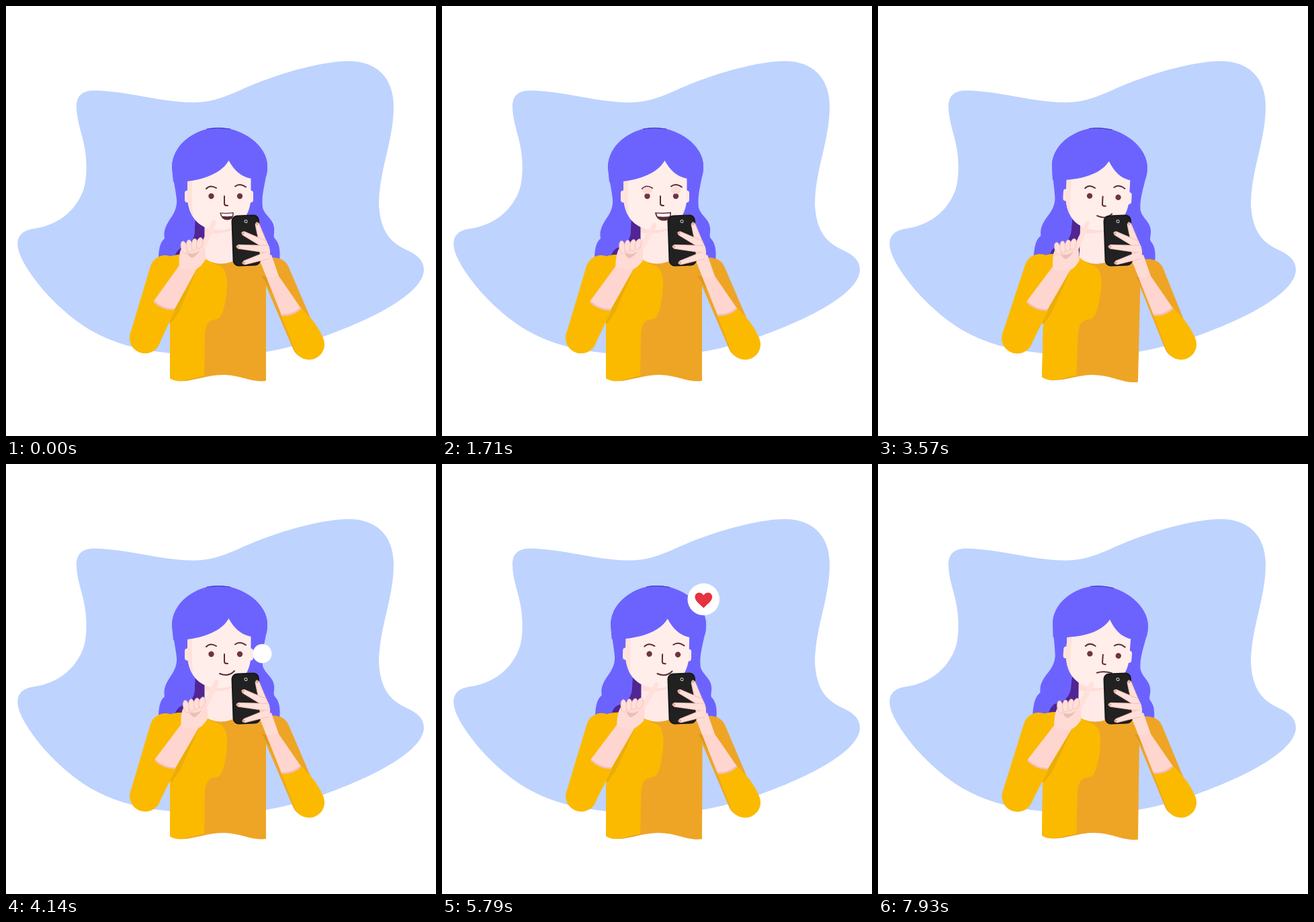
These frames come from a looping animation (640x640 px, 8000 ms). An HTML page:

```html
<!DOCTYPE html>
<html lang="en">
<head>
<meta charset="utf-8">
<title>Woman with phone</title>
<style>
  html, body { margin: 0; width: 100%; height: 100%; overflow: hidden; background: #fff; }
  svg { display: block; width: 100vw; height: 100vh; }
  .line { fill: none; stroke: #5f2a38; stroke-width: 2; stroke-linecap: round; stroke-linejoin: round; }
  .skin { fill: #ffd5cf; }
  .cuff { fill: none; stroke: #f3bdbb; stroke-width: 2.5; }
  .finger { fill: #ffdfd9; stroke: #f0b8b0; stroke-width: .7; }
  .sleeve { stroke-linecap: round; }
</style>
</head>
<body>
<svg viewBox="0 0 640 640">
  <path fill="#bed3fe" d="M105 152C104 130 117 124 140 126C190 129 235 144 282 143.500C325 142 345 123 400 105C435 93 480 82 510 82C550 82 577 105 577 150C577 200 555 245 555 295C557 335 572 352 596 363C613 371 622 379 622 393C620 430 540 468 470 493C400 517 340 526 260 518C200 514 160 502 125 482C80 455 38 408 22 373C12 350 18 336 38 332C62 329 85 319 101 299C117 279 120 262 119.500 235C119 200 106 180 105 152Z"/>

  <g class="head">
    <path fill="#6c63ff" d="M247 240C247 205 285 181 316 181C352 181 389 208 389 238C389 243 389 249 387 254C384 270 380 285 382 300C385 312 398 317 399 330C400 338 397 342 400 346C406 352 409 362 407 380H227C227 362 229 352 236 346C234 335 238 327 243 319C250 309 255 300 254 288C252 270 248 255 247 240Z"/>
    <path fill="#512593" d="M282 315L305 325V378H250C252 366 257 361 264 359C276 355 282 345 281 330Z"/>
  </g>

  <line id="armL" class="sleeve" stroke="#fbba00" stroke-width="46"/>
  <line id="armR" class="sleeve" stroke="#eea526" stroke-width="42"/>

  <g id="body">
    <path fill="#eea526" d="M244 554V420L225 385Q240 370 262 370L296 374Q320 392 345 375L402 374.500L387 410V558C365 561 350 549 322 549C292 549 265 566 244 554Z"/>
    <path fill="#fbba00" d="M244 554V420L225 385Q240 370 262 370L296 374Q305 383 316 386C326 390 329 400 329 413C328 440 323 464 314 466C300 467 297 475 296 490L295 550.500C275 553 258 564 244 554Z"/>
    <path fill="#ffeae7" d="M295.500 322H340L347 375Q334 383.500 320 383.500Q305 383.500 295.500 375Z"/>
    <path fill="#ffdcd8" d="M296 328H338V333Q318 341 296 337Z"/>
    <path fill="#d99a1c" d="M380 401L387 403L394 424L387 412Z"/>
  </g>

  <g class="head">
    <rect x="266" y="274.500" width="10" height="18" rx="4" fill="#ffe6e0"/>
    <rect x="358" y="274.500" width="10" height="18" rx="4" fill="#ffe9e4"/>
    <path fill="#ffeeea" d="M270 250V285C271 316 290 334 319 333.500C346 333 362 315 364.500 288V240L331 225Z"/>
    <path fill="#ffe2da" d="M270 255H277V292Q277 304 279 313Q270 300 270 284Z"/>
    <path fill="#6c63ff" d="M249 262Q260 262 270 261C300 257 322 247 331.500 230C341 247 352 255 366 257L387 253C389 246 389 242 389 238C389 208 352 181 316 181C285 181 247 205 247 240Z"/>
    <path d="M299 183Q316 180 334 183" fill="none" stroke="#3f3ab8"/>
    <path class="line" d="M298 272Q304 265.500 313 271M341 268.500Q348 263 357 269.500"/>
    <g id="eyes"></g>
    <path class="line" d="M325 283V294.500Q325.500 297.500 330 297"/>
    <path id="lips" class="line"/>
    <g id="open">
      <path fill="#5b2936" d="M-11 -5Q0 -4 11 -5.500Q11.500 6 1 6Q-9 6 -11 -5Z"/>
      <path fill="#fff" d="M-9 -3.700Q0 -2.800 9.500 -4Q9.500 -.5 8.500 .3Q0 1 -7.500 .3Z"/>
    </g>
  </g>

  <g id="bubble">
    <circle r="20.500" fill="#fff"/>
    <path id="heart" fill="#e5323e" d="M0 11C-5 6 -11 2 -11 -3C-11 -9.500 -3 -10.500 0 -5C3 -10.500 11 -9.500 11 -3C11 2 5 6 0 11Z"/>
    <path id="rays" fill="none" stroke="#e5323e" stroke-width="2" stroke-linecap="round"/>
  </g>

  <g id="foreL">
    <path fill="#ebad06" d="M270 400L285 389Q276 413 257 456L246 472L239 470Z"/>
    <path fill="#fbba00" d="M187 483L220 438L252 452L227 505Z"/>
    <path class="skin" d="M220 439L258 386L297 374Q294 386 284 391L251 451Q234 453 220 439Z"/>
    <path class="cuff" d="M220.500 440.500Q234 452 250.500 451.500"/>
    <g id="handL">
      <path fill="#ffe0da" d="M286 364L308 321Q311 317.500 314 321Q315 324 297 360L292 372Z"/>
      <path fill="#ffdbd5" d="M258 390Q256 368 263 358L294 354Q299 366 297 378Q290 388 280 393Z"/>
      <g id="knuckles"></g>
      <path fill="#e9bfb6" d="M270 367Q279 371 289 364Q283 373 277 375Q271 372 270 367Z"/>
    </g>
  </g>
  <circle id="elbowL" r="23" fill="#fbba00"/>

  <path fill="#fbba00" d="M410 461L430 513A23 23 0 1 0 472 494Q464 476 453 464L439 449Z"/>
  <path class="skin" d="M382 378L387 402L410 460Q426 462 439 450L406 402L395 370Z"/>
  <path class="cuff" d="M410 460Q427 461 438.500 450"/>

  <g transform="rotate(-2 357 349)">
    <rect x="336.500" y="311" width="41.500" height="76" rx="8.500" fill="#212121"/>
    <rect x="338" y="312.500" width="38.500" height="73" rx="7" fill="none" stroke="#151515"/>
    <circle cx="358" cy="320.500" r="2" fill="#111" stroke="#ddd"/>
  </g>
  <path fill="#ffdbd5" d="M380 346L386 348Q394 358 393 370L405 401Q396 406 387 402L379 382L377 362Z"/>
  <g id="grip"></g>
</svg>

<script>
  const LOOP = 8000, TAU = Math.PI * 2;
  const $ = id => document.getElementById(id);
  const heads = document.querySelectorAll('.head');

  const clamp = v => Math.max(0, Math.min(1, v));
  const mix = (a, b, u) => a + (b - a) * u;
  const ramp = (t, a, b) => { const u = clamp((t - a) / (b - a)); return u * u * (3 - 2 * u); };
  const pulse = (t, a, b, c, d) => ramp(t, a, b) - ramp(t, c, d);

  function set(el, attrs) {
    for (const k in attrs) el.setAttribute(k, attrs[k]);
    return el;
  }
  function add(parent, tag, attrs) {
    return parent.appendChild(set(document.createElementNS('http://www.w3.org/2000/svg', tag), attrs));
  }
  function show(el, on) { el.style.display = on ? '' : 'none'; }
  function turn(x, y, deg, cx, cy) {
    const a = deg * Math.PI / 180, dx = x - cx, dy = y - cy;
    return [cx + dx * Math.cos(a) - dy * Math.sin(a), cy + dx * Math.sin(a) + dy * Math.cos(a)];
  }
  function limb(el, [x1, y1], [x2, y2]) { set(el, { x1, y1, x2, y2 }); }

  // Tapered finger with a nail, from its base to its tip
  function finger(x, y, tipX, tipY) {
    const len = Math.hypot(tipX - x, tipY - y), angle = Math.atan2(tipY - y, tipX - x) * 360 / TAU;
    const g = add($('grip'), 'g', { transform: `translate(${x} ${y}) rotate(${angle})` });
    add(g, 'path', { class: 'finger', d: `M0 -5.500L${len - 3} -3Q${len + 3} 0 ${len - 3} 3L0 5.500` });
    add(g, 'ellipse', { cx: len - 2, rx: 2.500, ry: 1.600, fill: '#e5a994' });
  }
  finger(382, 351, 373, 322);
  finger(386, 355, 351, 337);
  finger(389, 362, 343, 358);
  finger(389, 371, 352, 383);

  for (let i = 0; i < 4; i++) {
    add($('knuckles'), 'ellipse', {
      class: 'finger', rx: 4.500, ry: 9.500 - i * .4,
      transform: `translate(${265.500 + i * 7.800} ${359 - i * 2}) rotate(${i * 9 - 12})`,
    });
  }
  const lids = [305.500, 348].map(cx => {
    add($('eyes'), 'circle', { cx, cy: 283, r: 4.200, fill: '#6f3441' });
    return add($('eyes'), 'ellipse', { cx, rx: 7.500, fill: '#fbdcd7' });
  });

  function drawFace(t) {
    const blink = Math.max(...[1810, 5110].map(c => clamp(1 - Math.abs(t - c) / 130)));
    const ry = 4 + 5.500 * blink;
    for (const lid of lids) set(lid, { cy: 269 + ry, ry, opacity: clamp(blink * 5) });

    const shut = ramp(t, 3350, 3560), grin = Math.sin(Math.PI * t / 1140) ** 2;
    const x = 328.500 + grin * .5, y = 312.500 + grin * .4;
    set($('open'), { transform: `translate(${x} ${y}) scale(${.93 + .16 * grin} ${(1 + .12 * grin) * (1 - .8 * shut)})` });
    show($('open'), shut < 1);

    const sad = ramp(t, 6950, 7250);
    set($('lips'), { d: `M318 ${mix(312, 310.500, sad)}Q${mix(331, 328, sad)} ${mix(317.500, 306.500, sad)} 340 ${mix(308, 309.500, sad)}` });
    show($('lips'), shut === 1);
  }

  function drawBubble(t) {
    const u = clamp((t - 3700) / 2730);
    const x = 373 + 15 * u + 6 * Math.sin(3 * Math.PI * u);
    const y = 191 + 123 * (1 - u) ** 1.7;
    const size = 1.270 * Math.cbrt(u);
    set($('bubble'), {
      transform: `translate(${x} ${y}) scale(${size})`,
      opacity: 1 - .64 * ramp(t, 6050, 6430) - .36 * ramp(t, 6430, 6700),
    });
    set($('heart'), { transform: `scale(${ramp(t, 4250, 4750)})` });

    const near = mix(9, 14.500, ramp(t, 4650, 5250));
    let d = '';
    for (let i = 0; i < 6; i++) {
      const a = TAU * i / 6 + TAU / 4, c = Math.cos(a), s = Math.sin(a);
      d += `M${near * c} ${near * s}l${2 * c} ${2 * s}`;
    }
    set($('rays'), { d, opacity: pulse(t, 4700, 4950, 5250, 5600) });
  }

  function draw(t) {
    // Two leans: one with the whole torso, a later one mostly from the neck
    const sway = pulse(t, 1740, 2550, 3420, 4080), peer = ramp(t, 5070, 7000);
    const tilt = 1.600 * sway + .8 * peer, nod = 1.850 * sway + 3.300 * peer;
    const lift = t < 1710 ? 2.500 * Math.sin(TAU * t / 1710) ** 2 : 0;
    const base = `rotate(${tilt} 316 556)`;
    set($('body'), { transform: base });
    for (const h of heads) set(h, { transform: `${base} translate(0 ${-lift}) rotate(${nod} 318 388)` });

    const swipe = pulse(t, 1740, 2600, 2800, 3550) + pulse(t, 6930, 7420, 7480, 8060);
    const swing = 1.300 * ramp(t, 0, 4500) + 6.500 * swipe;
    const idle = .8 + 3.500 * Math.sin(TAU * (t - 4600) / 4185);
    const slide = swing * .25, elbow = [207 + slide, 494 + slide];
    limb($('armL'), turn(237, 394, tilt, 316, 556), elbow);
    limb($('armR'), turn(401, 396, tilt, 316, 556), [447, 503]);
    set($('elbowL'), { cx: elbow[0], cy: elbow[1] });
    set($('foreL'), { transform: `translate(${slide} ${slide}) rotate(${swing} 207 494)` });
    set($('handL'), { transform: `rotate(${idle + 24 * swipe} 277 382)` });

    drawFace(t);
    drawBubble(t);
  }

  const start = performance.now();
  function tick(now) {
    draw(Math.max(0, now - start) % LOOP);
    requestAnimationFrame(tick);
  }
  draw(0);
  requestAnimationFrame(tick);
</script>
</body>
</html>
```
